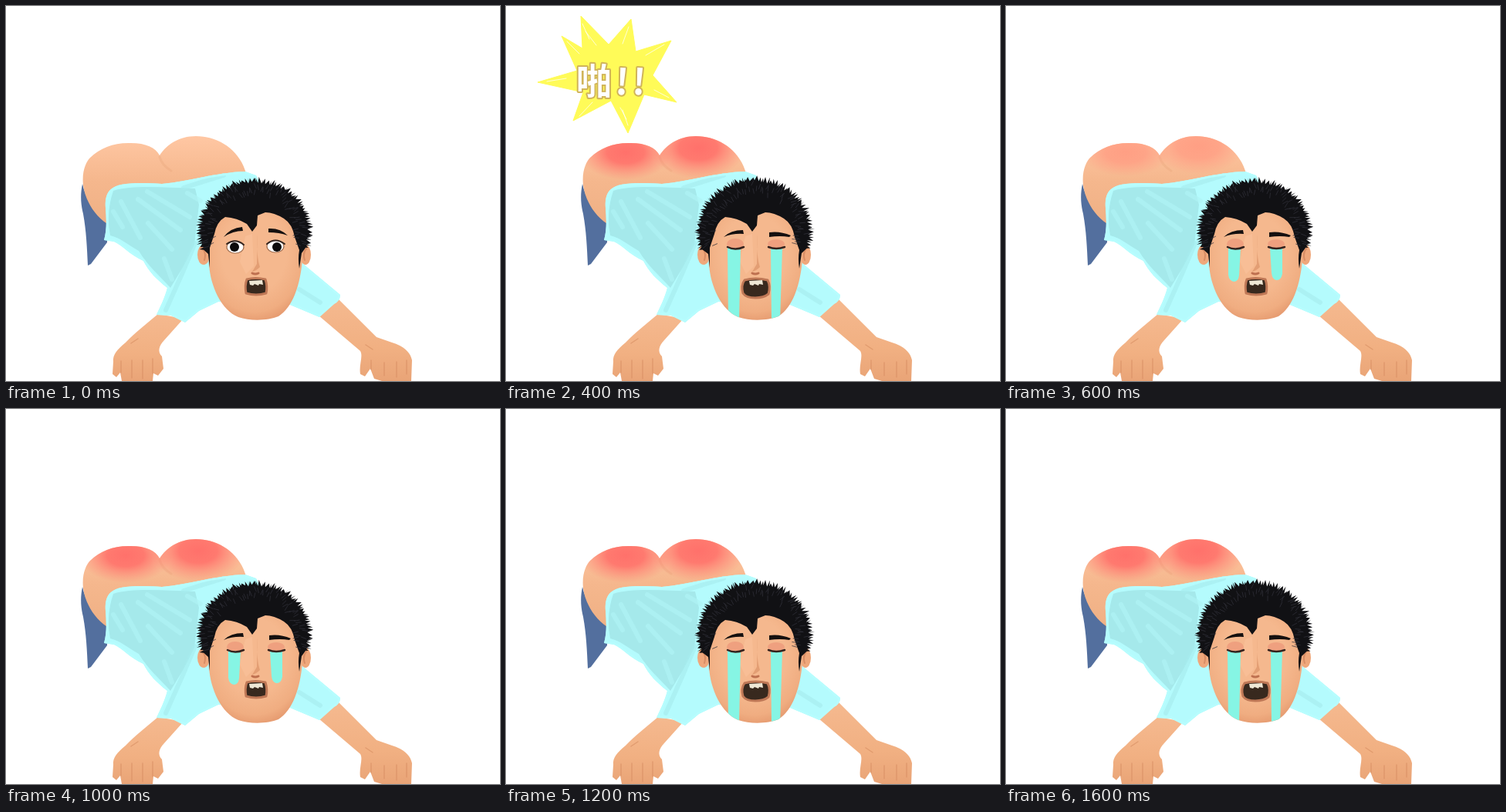
Write an HTML page that moves like this. It is 640x487 px and loops after 1.8 s.

```html
<!DOCTYPE html>
<html lang="zh">
<head>
<meta charset="utf-8">
<style>
html, body { margin: 0; width: 100%; height: 100%; overflow: hidden; background: #fff; }
svg { display: block; width: 640px; height: 487px; }
text { font: 900 46px "Noto Sans CJK TC", "Noto Sans CJK SC", "Noto Sans CJK JP", "Noto Sans CJK", sans-serif; fill: #fff; stroke: #d0b45a; stroke-width: 4; stroke-linejoin: round; paint-order: stroke; }
.line { fill: none; stroke-linecap: round; stroke-linejoin: round; }
</style>
</head>
<body>
<svg viewBox="0 0 640 487">
  <defs>
    <linearGradient id="skin" x1="0" y1="0" x2="0" y2="1">
      <stop stop-color="#ffc7a3"/><stop offset=".5" stop-color="#f5b78d"/><stop offset="1" stop-color="#efb084"/>
    </linearGradient>
    <linearGradient id="arm" x1="0" y1="0" x2="0" y2="1">
      <stop stop-color="#f5b98f"/><stop offset=".6" stop-color="#f1b082"/><stop offset="1" stop-color="#e9a477"/>
    </linearGradient>
    <radialGradient id="face" cx=".5" cy=".42" r=".6">
      <stop offset=".55" stop-color="#f5b88e"/><stop offset=".85" stop-color="#f0ad81"/><stop offset="1" stop-color="#e69b70"/>
    </radialGradient>
    <radialGradient id="pink">
      <stop stop-color="#ff9f84"/><stop offset=".45" stop-color="#ff9f84" stop-opacity=".85"/><stop offset="1" stop-color="#ff9f84" stop-opacity="0"/>
    </radialGradient>
    <radialGradient id="red">
      <stop stop-color="#ff716b"/><stop offset=".4" stop-color="#ff766d" stop-opacity=".95"/><stop offset="1" stop-color="#ff8576" stop-opacity="0"/>
    </radialGradient>
    <path id="seat" d="M100 233C98 214 104 202 109 197C122 184 141 177 162 178C181 178 194 184 199 194C208 180 224 169 246 169C277 169 303 188 311 217L300 240L135 285C117 276 103 254 100 233Z"/>
    <path id="chin" d="M258 285L263 336C265 364 279 395 301 404C315 409 339 409 353 403C372 391 381 362 384 330L385 285C350 250 290 250 258 285Z"/>
    <path id="top" d="M136 238C145 230 166 229 202 231C237 228 272 216 310 215L324 220L385 335L433 375Q433 383 425 387L406 404L368 388L275 384L250 396L232 411L214 402L195 401C201 388 206 378 209 366C195 355 185 345 178 331C160 323 150 310 140 306L127 304C131 290 130 276 129 262C128 250 131 242 136 238Z"/>
    <clipPath id="inSeat"><use href="#seat"/></clipPath>
    <clipPath id="inFace"><use href="#chin"/></clipPath>
    <clipPath id="inTop"><use href="#top"/></clipPath>
  </defs>

  <path fill="#536f9e" d="M99 231C96 246 97 258 100 270C104 292 105 314 106 337L110 335L131 307V278C115 270 104 252 99 231Z"/>
  <use href="#seat" fill="url(#skin)"/>
  <path class="line" stroke="#e9a67c" stroke-width="3" opacity=".35" d="M199 196Q202 207 214 214"/>
  <g id="pinkGlow" clip-path="url(#inSeat)" fill="url(#pink)">
    <ellipse cx="155" cy="190" rx="58" ry="31"/><ellipse cx="249" cy="182" rx="60" ry="36"/>
  </g>
  <g id="redGlow" clip-path="url(#inSeat)" fill="url(#red)">
    <ellipse cx="155" cy="190" rx="60" ry="36"/><ellipse cx="249" cy="184" rx="62" ry="40"/>
  </g>

  <g fill="url(#arm)">
    <path d="M197 400C184 411 166 425 155 437C144 446 138 453 139 462L138 478L143 482L148 476L150 487H190L191 477L197 480L204 471L202 455C196 449 198 441 205 434L230 406Z"/>
    <path d="M405 402L459 448C463 455 457 466 459 478L465 481L472 471L477 484L487 487H525L526 460C524 449 514 441 500 437L480 430L431 381Z"/>
  </g>
  <path class="line" stroke="#d99165" stroke-width="1.5" opacity=".65" d="M149 461V476M163 460V483M177 460V484M190 458V477M162 438L171 432M473 460V472M490 463V480M506 462V482M519 460V478M466 440L475 446"/>

  <use href="#top" fill="#b4fbfd"/>
  <g clip-path="url(#inTop)">
    <path fill="#a5e9eb" d="M139 240C165 232 205 236 245 237L250 258L244 310L230 338L213 366C199 350 183 337 172 318C158 310 148 301 135 298Q129 270 139 240Z"/>
    <path class="line" stroke="#b0f4f6" stroke-width="6" opacity=".7" d="M139 267L151 287M149 254L174 301M183 241L238 274M171 251L226 291M184 282L215 316M205 328L215 355M235 243L252 253"/>
    <path class="line" stroke="#a6edef" stroke-width="6" opacity=".65" d="M245 308L228 348L207 395M230 236L282 220M380 368L407 385"/>
    <use href="#top" class="line" stroke="#b7fdfe" stroke-width="5"/>
  </g>

  <g fill="#efa77b">
    <ellipse cx="256" cy="323" rx="8" ry="13"/><ellipse cx="388" cy="323" rx="7" ry="13"/>
  </g>
  <path class="line" stroke="#d88d65" stroke-width="2" d="M254 315Q260 320 257 330M389 315Q384 321 387 330"/>
  <use href="#chin" fill="url(#face)"/>
  <path fill="#fbc5a0" opacity=".5" d="M310 299L319 296L321 338L311 348L303 332Z"/>
  <path fill="#dc966b" opacity=".75" d="M326 296Q324 325 329 339Q324 344 319 345L325 335Z"/>
  <path class="line" stroke="#bf7150" stroke-width="3" d="M319 347Q323 349 327 347"/>

  <g id="openEyes">
    <g fill="#fff" stroke="#a17052" stroke-width="1.2">
      <ellipse cx="297" cy="313" rx="11" ry="8"/><ellipse cx="349" cy="312" rx="11" ry="8"/>
    </g>
    <path class="line" stroke="#33251f" stroke-width="2" d="M286 309Q297 301 308 310M338 309Q349 300 361 309"/>
    <g fill="#0c0b0b"><circle cx="296" cy="313" r="6"/><circle cx="351" cy="313" r="6"/></g>
    <path fill="#15100f" d="M282 300Q291 288 306 287L307 292Q294 292 282 300ZM340 289Q355 288 365 298Q354 294 340 294Z"/>
  </g>
  <g id="shutEyes">
    <g fill="#ee9c7d" opacity=".85">
      <ellipse cx="297" cy="309" rx="11" ry="7"/><ellipse cx="350" cy="309" rx="11" ry="6"/>
    </g>
    <path fill="#15100f" d="M282 300Q291 291 307 291L308 296Q294 295 282 300ZM341 294Q355 292 369 298L367 300Q355 298 341 300Z"/>
  </g>
  <g clip-path="url(#inFace)" fill="#86f5e4">
    <path id="shortTears" d="M288 314H304L302 350Q301 358 295 358Q289 357 288 349ZM342 314H358V348Q356 357 350 356Q345 355 344 347Z"/>
    <path id="longTears" d="M287 314H304L302 410H288ZM343 314H358L355 410H344Z"/>
  </g>
  <path id="lashes" class="line" stroke="#35221d" stroke-width="2.5" d="M287 313Q297 318 308 313M340 313Q350 317 361 313"/>

  <g stroke="#bf7856" stroke-width="3" fill="#38291e" stroke-linejoin="round">
    <path id="smallMouth" d="M312 355Q323 352 336 355Q339 364 337 373Q324 377 311 373Q309 363 312 355Z"/>
    <path id="bigMouth" d="M309 356Q323 352 339 356Q343 364 340 374Q334 379 323 379Q311 379 307 373Q304 363 309 356Z"/>
  </g>
  <path fill="#eee7d5" d="M315 357L332 356L333 362L328 361L327 363L322 361L320 363L316 362Z"/>
  <path id="hair" fill="#111114"/>
  <path id="strands" class="line" stroke="#30313a" stroke-width="1" opacity=".75"/>

  <g id="burst">
    <path fill="#fffb58" stroke="#fffb58" stroke-linejoin="round" d="M97 13L133 50L162 17L168 59L214 45L190 90L221 125L179 115L158 165L136 123L87 149L100 112L41 99L92 84L72 39L99 55Z"/>
    <path class="line" stroke="#fff" stroke-width="1" opacity=".75" d="M99 23L108 43M159 27L151 49M205 50L181 64M211 119L192 109M158 155L151 135M95 143L112 125M53 98L78 94M79 46L95 62M103 33L117 51M148 132L156 147"/>
    <text x="91" y="114">啪</text>
    <text x="142" y="115" transform="rotate(4 150 98)">!</text>
    <text x="164" y="115" transform="rotate(4 172 98)">!</text>
  </g>
</svg>
<script>
const $ = id => document.getElementById(id);
const show = (id, on) => $(id).style.display = on ? "" : "none";

function seeded(seed) {
  return () => (seed = seed * 16807 % 2147483647) / 2147483647;
}

// Spiky outline around an ellipse, closed by a smooth fringe.
function makeHair(seed, grow) {
  const random = seeded(seed), count = 150;
  const at = (angle, r) =>
    `${(322 + 73 * r * Math.cos(angle)).toFixed(1)} ${(293 + 68 * r * Math.sin(angle)).toFixed(1)}`;
  let outline = "M264 340L262 322", strands = "";
  for (let i = 0; i <= count; i++) {
    const angle = 2.78 + i / count * 3.84;
    const tip = i % 2 ? grow + random() * .055 : grow - .035 - random() * .04;
    const lean = (random() - .5) * .05;
    outline += "L" + at(angle + lean, tip);
    if (i % 2) {
      const r = .68 + random() * .22;
      strands += `M${at(angle, r)}L${at(angle + lean * 2, r + .09)}`;
    }
  }
  outline += "L383 321L380 341Q378 328 380 317L374 300Q371 283 360 276Q347 268 336 268L326 272L325 285L319 293L312 283Q299 275 284 274Q273 280 270 296L264 314Z";
  return { outline, strands };
}

const calmHair = makeHair(71, 1), wildHair = makeHair(293, 1.02);
let lastStep = -1;

function draw(step) {
  const cry = step > 0, wail = cry && step % 2 === 0;
  const sore = step === 0 ? 0 : step === 1 || step === 3 ? 1 : 2;
  const hair = wail ? wildHair : calmHair;
  show("burst", step === 1 || step === 2);
  show("pinkGlow", sore === 1);
  show("redGlow", sore === 2);
  show("openEyes", !cry);
  show("shutEyes", cry);
  show("lashes", cry);
  show("shortTears", cry && !wail);
  show("longTears", wail);
  show("smallMouth", !wail);
  show("bigMouth", wail);
  $("hair").setAttribute("d", hair.outline);
  $("strands").setAttribute("d", hair.strands);
}

function tick() {
  const step = Math.floor(performance.now() % 1800 / 200);
  if (step !== lastStep) draw(lastStep = step);
  requestAnimationFrame(tick);
}
tick();
</script>
</body>
</html>
```
